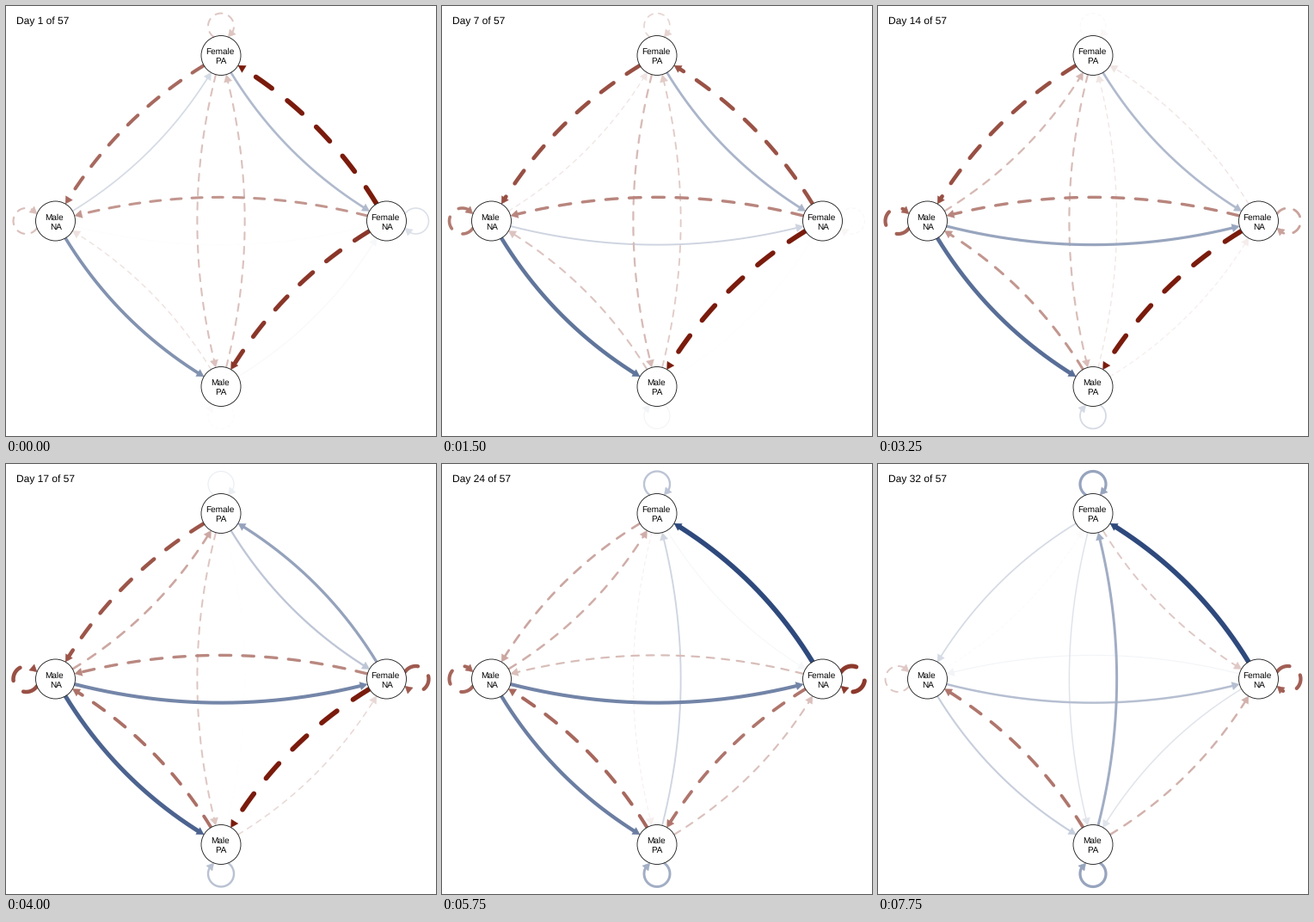
Write a matplotlib script that moves like this. It is 500 by 500 pixels and loops after 8000 ms.

```python
import numpy as np
import matplotlib.pyplot as plt
from matplotlib.animation import FuncAnimation
from matplotlib.patches import Circle, Polygon

plt.rcParams["text.hinting"] = "no_hinting"
plt.rcParams["text.hinting_factor"] = 1

SIZE, DPI = 500, 100
PX = 72 / DPI  # points per pixel
FRAMES, STEP_MS = 32, 250
CENTER, RING, RADIUS = 250, 192.5, 23
HEAD_LEN, HEAD_HALF = 8, 4.6
LOOP_DIST, LOOP_R, LOOP_GAP = 34, 15, np.radians(33.4)
BEND = 0.0718
BLUE = np.array([46, 73, 124]) / 255
RED = np.array([122, 27, 12]) / 255

# Outward direction of each node; the key is its initials
NODES = {"FP": (0, -1), "MN": (-1, 0), "FN": (1, 0), "MP": (0, 1)}
WORDS = {"F": "Female", "M": "Male", "P": "PA", "N": "NA"}

# Signed strength at four evenly spaced times: positive blue, negative dashed red
EDGES = {
    "FP MN": (-.66, -.78, -.5, .2),
    "MN FP": (.2, -.25, -.38, -.02),
    "FP FN": (.38, .4, .12, -.24),
    "FN FP": (-1, -.47, 1, 1),
    "FN MN": (-.46, -.54, -.36, .06),
    "MN FN": (.01, .38, .7, .35),
    "FP MP": (-.27, -.3, -.12, .15),
    "MP FP": (-.27, -.17, .16, .45),
    "MN MP": (.6, .78, .75, .27),
    "MP MN": (-.13, -.36, -.67, -.6),
    "FN MP": (-.88, -1, -.73, .15),
    "MP FN": (.04, -.03, -.25, -.34),
    "FP FP": (-.25, -.11, .26, .5),
    "MN MN": (-.28, -.66, -.7, -.24),
    "FN FN": (.17, -.22, -.88, -.7),
    "MP MP": (-.02, .13, .42, .5),
}


def ease_through(values):
    """Monotone cubic through evenly spaced values, one result per frame."""
    y = np.array(values, float)
    d = np.diff(y)
    m = np.zeros(len(y))
    for i, (a, b) in enumerate(zip(d, d[1:]), 1):
        if a * b > 0:
            m[i] = 2 * a * b / (a + b)
    m[0] = 1.5 * d[0] - 0.5 * m[1]
    m[-1] = 1.5 * d[-1] - 0.5 * m[-2]
    x = np.linspace(0, len(d), FRAMES)
    k = np.minimum(x.astype(int), len(d) - 1)
    s = x - k
    bend = (1 - s) * (m[k] - d[k]) - s * (m[k + 1] - d[k])
    return y[k] + s * d[k] + s * (1 - s) * bend


def position(name):
    return CENTER + RING * np.array(NODES[name], float)


def loop_path(name):
    """Circle leaving and re-entering the node on its outer side."""
    out = np.array(NODES[name])
    a = np.arctan2(-out[1], -out[0]) + np.linspace(LOOP_GAP, 2 * np.pi - LOOP_GAP, 300)
    ring = np.column_stack([np.cos(a), np.sin(a)])
    return position(name) + LOOP_DIST * out + LOOP_R * ring


def curve_path(start, end):
    """Arc bowed to the right of travel, cut at both node borders."""
    p, q = position(start), position(end)
    along = q - p
    right = np.array([-along[1], along[0]])
    t = np.linspace(0, 1, 1200)[:, None]
    pts = p + along * t + right * BEND * 4 * t * (1 - t)
    free = np.minimum(np.hypot(*(pts - p).T), np.hypot(*(pts - q).T)) >= RADIUS
    return pts[free]


def split_head(pts):
    """Return the shaft and the triangle at the end of a path."""
    tip = pts[-1]
    end = np.nonzero(np.hypot(*(pts - tip).T) >= HEAD_LEN)[0][-1]
    base = pts[end]
    unit = (tip - base) / np.linalg.norm(tip - base)
    side = HEAD_HALF * np.array([-unit[1], unit[0]])
    return pts[:end + 1], [tip, base + side, base - side]


fig = plt.figure(figsize=(SIZE / DPI, SIZE / DPI), dpi=DPI, facecolor="white")
ax = fig.add_axes([0, 0, 1, 1])
ax.set_xlim(0, SIZE)
ax.set_ylim(SIZE, 0)
ax.axis("off")


def label(x, y, text, size, align):
    return ax.text(x, y, text, fontsize=size * PX, family="Liberation Sans",
                   ha=align, va="baseline", color="black", zorder=4)


edges = []
for key in EDGES:
    a, b = key.split()
    shaft, tri = split_head(loop_path(a) if a == b else curve_path(a, b))
    line, = ax.plot(*shaft.T, solid_capstyle="round", dash_capstyle="round")
    head = ax.add_patch(Polygon(tri, closed=True, lw=0.4 * PX))
    edges.append((line, head))

for name in NODES:
    x, y = position(name)
    ax.add_patch(Circle((x, y), RADIUS, fc="white", ec="#222222", lw=0.9 * PX, zorder=3))
    label(x - 1.3, y - 1.5, WORDS[name[0]], 9.6, "center")
    label(x + 0.3, y + 9.8, WORDS[name[1]], 9.6, "center")

day = label(12, 22, "", 12, "left")

# The strongest edge always has full colour and width
strength = np.array([ease_through(v) for v in EDGES.values()])
strength /= np.abs(strength).max(axis=0)


def update(frame):
    for (line, head), w in zip(edges, strength[:, frame]):
        a = abs(w)
        color = 1 - a * (1 - (BLUE if w > 0 else RED))
        line.set_linewidth((0.75 + 4.95 * a) * PX)
        line.set_linestyle("-" if w > 0 else (0, (4, 4)))
        for part in (line, head):
            part.set_color(color)
            part.set_zorder(1 + a)
    day.set_text(f"Day {frame + 1} of 57")
    return [day]


anim = FuncAnimation(fig, update, frames=FRAMES, interval=STEP_MS,
                     repeat=True, repeat_delay=0, blit=False)
plt.show()
```
